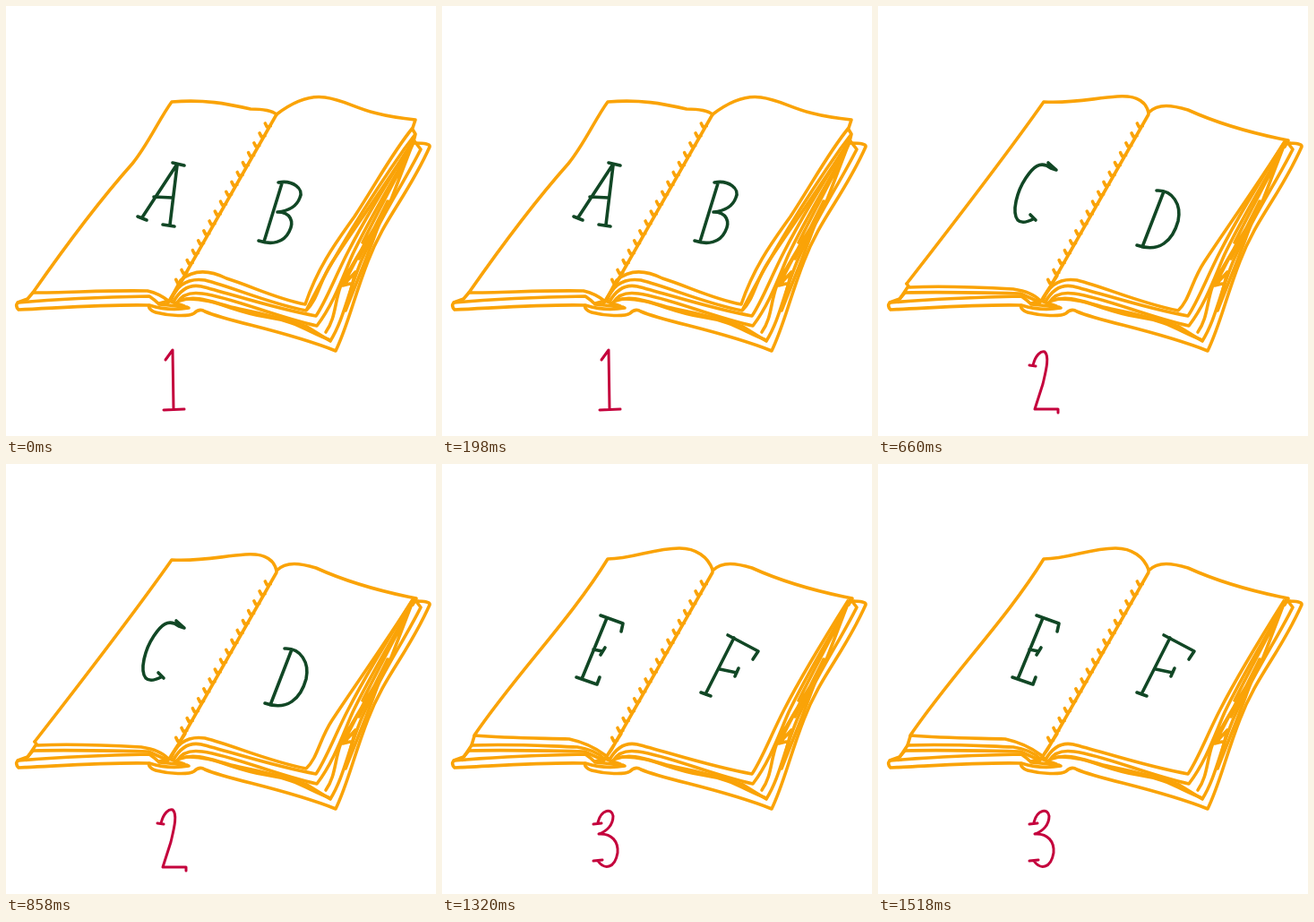
An HTML page for the animation above (1650 ms loop, 480 by 480 pixels).

```html
<!DOCTYPE html>
<html lang="en">
<head>
<meta charset="utf-8">
<title>Page flip</title>
<style>
html, body { margin: 0; width: 100%; height: 100%; overflow: hidden; background: #fff }
svg { display: block; width: 100%; height: 100% }
path { fill: none; stroke-width: 3.6; stroke-linecap: round; stroke-linejoin: round }
.book { stroke: #faa307 }
.flap { stroke: #faa307; fill: #fff }
.ink { stroke: #114725 }
.thin { stroke: #114725; stroke-width: 1.5 }
.num { stroke: #c4003c; stroke-width: 3 }
</style>
</head>
<body>
<svg viewBox="0 0 480 480"></svg>
<script>
const STEP = 330, POSES = 5;
const svg = document.querySelector('svg');
const parts = [];

// Adds a path that is visible in the listed poses.
function add(poses, kind, d) {
  const path = document.createElementNS(svg.namespaceURI, 'path');
  path.setAttribute('class', kind);
  path.setAttribute('d', d);
  svg.append(path);
  parts.push({ path, poses });
}

const ALL = '01234';

// Cover
add(ALL, 'book', 'M30 320L24 327L13 331Q10 335 14 339C60 337 110 333 159 334Q160 340 167 342C182 346 204 347 210 343Q216 337 222 341C250 353 310 362 368 385C382 356 388 326 404 285C422 237 449 211 473 157Q474 153 456 153');
add(ALL, 'book', 'M14 331C60 327 110 325 160 324Q166 328 171 333L202 336M160 334Q182 341 204 337M171 332L182 329L199 335');

// Right-hand block of pages
add(ALL, 'book', 'M187 330Q199 309 218 313C250 321 300 338 346 346C357 330 367 303 382 274C401 237 421 204 453 153');
add(ALL, 'book', 'M191 331Q199 318 219 321C255 326 300 347 347 357C366 332 376 302 387 277C407 235 432 195 456 151');
add(ALL, 'book', 'M194 329C214 321 235 333 260 338S310 349 336 358L362 374C378 349 383 313 400 277C421 231 442 201 463 160L456 151');
add(ALL, 'book', 'M202 327C232 326 255 342 290 347S337 364 362 373M357 364C372 343 364 319 385 292L430 216L453 156M402 262L376 312L390 297L379 340L402 282L426 218L394 282M376 312L384 310M443 177L418 225L398 264');
add('0123', 'book', 'M184 329Q194 302 222 306C254 314 293 332 335 340C348 328 350 307 364 286C391 245 420 205 455 150');

// Right-hand page tops
add('0', 'book', 'M302 121C323 105 342 100 356 102C386 106 394 121 457 127L454 136C431 164 414 197 389 235C370 262 349 289 334 333C302 327 275 313 246 304C224 293 208 295 195 306L182 330M454 138L457 143L445 159C410 209 371 270 336 338M457 143L455 151');
add('13', 'book', 'M361 121C392 127 424 130 450 138Q459 142 456 149L443 166');
add('24', 'book', 'M302 119C313 108 329 111 346 116C377 130 410 140 448 148L458 150L454 157');

// Left-hand pages
add('01', 'book', 'M302 121Q295 115 273 115C246 109 222 104 185 107C171 126 159 154 141 176C101 221 67 267 30 320C70 320 115 317 158 318Q171 321 181 329');
add('2', 'book', 'M302 119C298 102 282 100 267 101C240 103 216 109 185 107C140 171 88 238 32 310');
add('3', 'book', 'M302 121C284 104 266 97 249 98C227 102 207 107 183 107C165 132 153 159 134 184C98 227 68 272 30 320');
add('4', 'book', 'M302 118C297 104 284 94 265 94C236 94 213 106 185 106C143 174 83 234 36 303C73 306 110 306 142 307Q165 312 182 325L187 330');
add('2', 'book', 'M32 310L35 314C78 312 115 314 151 316Q172 319 181 329');
add('3', 'book', 'M35 314C70 314 94 310 124 309Q152 315 165 315L181 327');
add('4', 'book', 'M36 304L33 314C80 312 116 315 151 316Q171 319 181 329');
add('234', 'book', 'M33 314L25 326M30 320C76 319 117 320 159 321L179 330');

// Letters lying on the pages
add('01', 'ink', 'M147 235L157 239M152 236L190 178M186 175L199 178M191 178L183 244M175 244L188 246M165 213L186 214');
add('0', 'ink', 'M308 198L288 263M304 197C320 194 333 204 328 214C324 225 313 229 303 230C318 230 322 241 316 252C310 264 297 267 282 262');
add('12', 'ink', 'M319 207L295 269M311 206C329 205 339 222 335 240C329 262 314 276 289 267');
add('23', 'ink', 'M190 175L199 183L193 181C181 172 173 180 165 192C155 207 149 230 156 239Q161 244 173 238M170 233L176 239');
add('4', 'ink', 'M184 172L156 240M177 169L202 178L200 187M169 207L179 209M182 205L177 213M150 238L173 246L176 238');
add('34', 'ink', 'M326 194L294 257M319 191L353 209L347 218M310 229L329 233M331 228L327 237M289 255L300 259');

// Turning page
add('13', 'flap', 'M302 121C316 107 346 106 357 84L363 53C365 87 358 100 359 128C356 158 344 192 323 226Q317 238 308 238C286 240 262 238 240 255C222 269 206 284 193 305');
add('1', 'ink', 'M316 144L285 209M313 143C324 140 327 151 320 161C314 173 306 178 298 178C308 178 308 188 303 197C297 207 288 212 279 208');
add('3', 'thin', 'M306 148C295 160 287 187 283 207M307 148C313 166 300 201 284 208');
add('3', 'ink', 'M304 147L308 148M281 207L285 208');

// Spine and stitching
let stitches = 'M302 121L189 319L180 332M200 301L184 326';
for (let y = 131; y < 310; y += 10.9) {
  const x = 302 - (y - 121) * 0.571;
  stitches += `M${x - 7} ${y}l2 4l4 -1`;
}
add(ALL, 'book', stitches);

// Page numbers
add('01', 'num', 'M178 395L186 384L187 450M176 451L199 450');
add('23', 'num', 'M169 401L176 402M173 401C176 389 182 385 186 386C192 391 187 409 184 422L175 450L201 450L201 454');
add('4', 'num', 'M169 402L178 401M174 400C178 385 190 384 191 393C191 403 184 410 175 413C190 412 197 422 196 434C193 452 181 453 174 443M169 443L179 442');

function draw() {
  const pose = Math.floor(performance.now() / STEP) % POSES;
  for (const { path, poses } of parts)
    path.style.display = poses.includes(pose) ? '' : 'none';
  requestAnimationFrame(draw);
}
draw();
</script>
</body>
</html>
```
